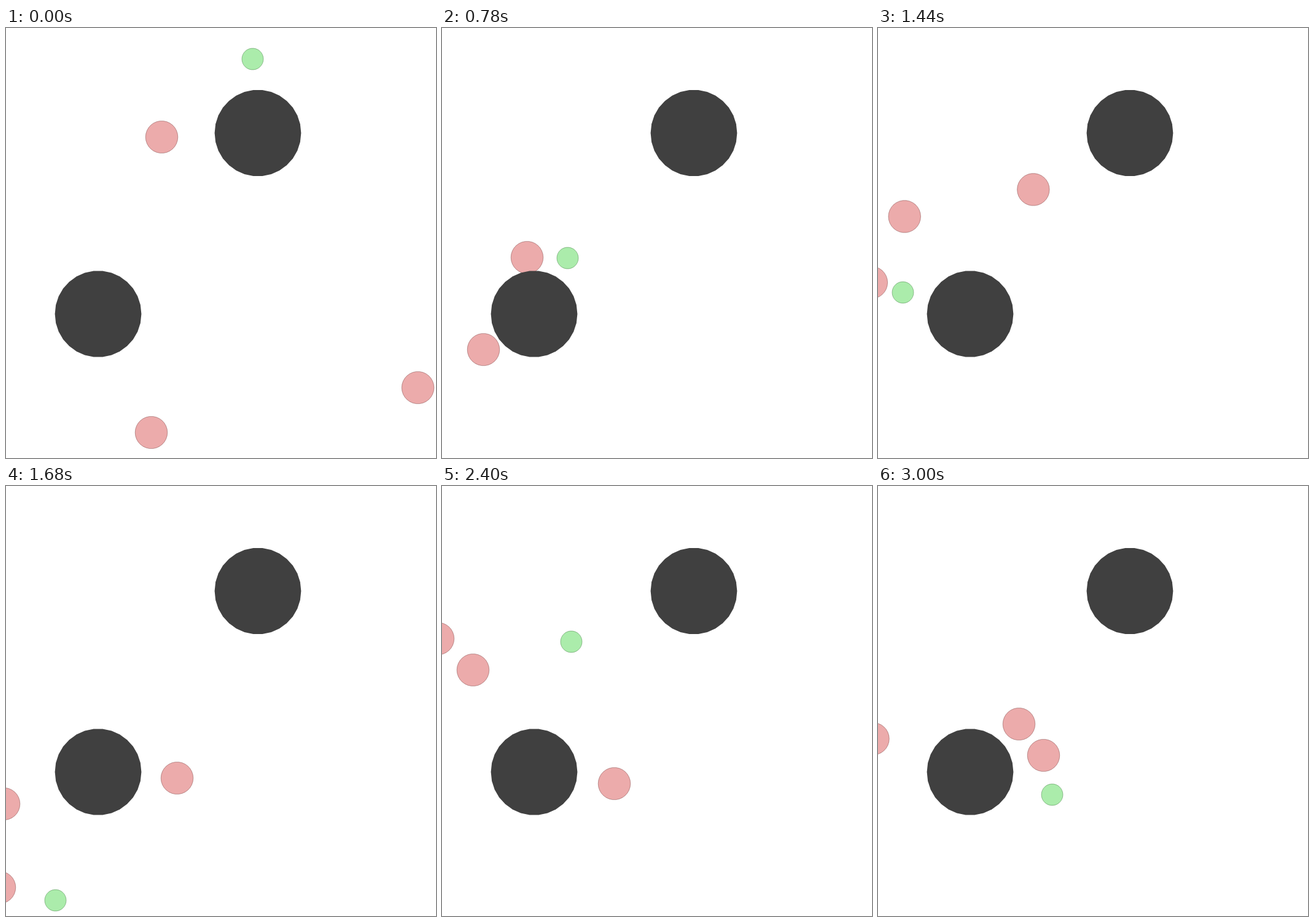
These frames come from a looping animation (700x700 px, 3030 ms). An HTML page with a canvas:

```html
<!DOCTYPE html>
<html>
<head>
<meta charset="utf-8">
<title>Pursuit</title>
<style>
  html, body { margin: 0; width: 100%; height: 100%; overflow: hidden; background: #fff; }
  canvas { display: block; }
</style>
</head>
<body>
<canvas width="700" height="700"></canvas>
<script>
const ctx = document.querySelector('canvas').getContext('2d');
const STEP = 30, LOOP = 3030, MOMENTUM = 1.5, SIDES = 30;

// Each mover passes a few key points, keyed by step; momentum shapes the turns between them.
const chasers = [
  { 0: [253, 177], 13: [72, 42], 26: [138, 373], 40: [213, 125], 56: [278, 475], 80: [280, 484], 100: [269, 438] },
  { 0: [670, 585], 13: [276, 585], 26: [67, 523], 40: [3, 224], 56: [-11, 653], 80: [-7, 248], 100: [-8.5, 411] },
  { 0: [236, 658], 13: [-130, 600], 26: [-140, 380], 40: [49, 146], 56: [-4, 517], 80: [50, 299], 100: [229, 387] }
];
const runner = {
  0: [401, 50], 13: [19, 122], 20: [-10, 310], 26: [204, 374], 40: [105, 181], 48: [40, 430],
  56: [80, 674], 65: [240, 700], 80: [210, 253], 87: [235, 63], 100: [283, 502]
};

// Cubic Hermite curve along one axis; movers start at rest and coast to the end
function locate(path, step) {
  const times = Object.keys(path).map(Number);
  const last = times.length - 1;
  const i = Math.min(times.findLastIndex(t => t <= step), last - 1);
  const h = times[i + 1] - times[i], u = (step - times[i]) / h, v = 1 - u;

  return [0, 1].map(axis => {
    const at = n => path[times[n]][axis];
    const slope = n => (at(n + 1) - at(n)) / (times[n + 1] - times[n]);
    const speed = n => {
      if (n === 0) return 0;
      if (n === last) return slope(n - 1);
      const before = times[n] - times[n - 1], after = times[n + 1] - times[n];
      return MOMENTUM * (slope(n - 1) * after + slope(n) * before) / (before + after);
    };
    return v * v * (1 + 2 * u) * at(i) + u * u * (3 - 2 * u) * at(i + 1) +
      h * u * v * (v * speed(i) - u * speed(i + 1));
  });
}

function disc([x, y], r, fill, line) {
  ctx.beginPath();
  for (let i = 0; i < SIDES; i++) {
    const a = i / SIDES * 2 * Math.PI;
    ctx.lineTo(x + 0.5 + r * Math.cos(a), y + 0.5 + r * Math.sin(a));
  }
  ctx.closePath();
  ctx.fillStyle = fill;
  ctx.fill();
  if (line) {
    ctx.strokeStyle = line;
    ctx.stroke();
  }
}

function draw(now) {
  const step = Math.floor(now % LOOP / STEP);
  ctx.clearRect(0, 0, 700, 700);
  for (const path of chasers) disc(locate(path, step), 26.25, 'rgba(217,89,89,.5)', 'rgba(108,45,45,.42)');
  disc(locate(runner, step), 17.5, 'rgba(89,217,89,.5)', 'rgba(45,108,45,.42)');
  disc([409.5, 170.5], 70.4, '#404040');
  disc([149.5, 465], 70.4, '#404040');
}

let start;
function tick(now) {
  start ??= now;
  draw(now - start);
  requestAnimationFrame(tick);
}
draw(0);
requestAnimationFrame(tick);
</script>
</body>
</html>
```
